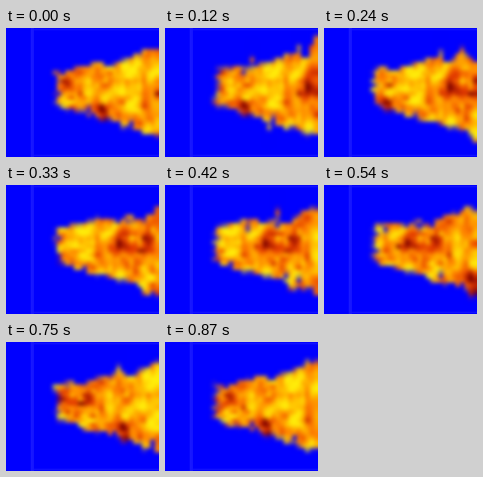
Recreate the animation shown at these times as a matplotlib script. Size 192 px wide and 162 px high, loop 0.9 s.

```python
import numpy as np
import matplotlib.pyplot as plt
from matplotlib.animation import FuncAnimation

W, H, DPI = 192, 162, 100
COLS, ROWS, STEPS = 36, 31, 30
CELL = W / COLS
TIP = 58
BLUE = np.array([0.0, 0.0, 1.0])

STOPS = np.linspace(0, 1, 5)
RAMP = np.array([(255, 238, 10), (255, 190, 0), (255, 130, 0),
                 (225, 55, 0), (120, 0, 0)]) / 255

# Hot spots drifting with the flow: column, height, size
SPOTS = [(6.8, -.2, 1.4), (9.2, -.12, 1.4), (14.2, -.31, 1.3),
         (10.6, .18, 1.0), (21.5, .68, 1.3), (25, .5, 1.5)]

rng = np.random.default_rng(12)
LEVELS = np.linspace(-1.8, 1.8, 23)
SHAPE = (STEPS, LEVELS.size)


def noise(spread, shape=SHAPE, blur=.25):
    """Random field that repeats along the flow."""
    a = rng.normal(0, spread, shape)
    return a + blur * (np.roll(a, 1, 0) + np.roll(a, -1, 0))


heat_tex = noise(.21)
rough_tex = noise(.09)
tip_tex = noise(.5)
rim = noise(.05, (STEPS, 2), .5)

# Flecks outside the edge and gaps inside it: column, height, x where visible
flecks = [(rng.integers(STEPS), rng.choice([-1, 1]) * rng.choice([.8, 1.2]),
           rng.uniform(70, 170)) for _ in range(12)]

rows_y = (np.arange(ROWS) + .5) * CELL


def wrap(d):
    return (d + STEPS / 2) % STEPS - STEPS / 2


def column(c, step):
    """Colours of one grid column after the flow has moved by step cells."""
    x = (c + .5) * CELL
    if x < TIP:
        return np.tile(BLUE, (ROWS, 1))
    u = (c + step) % STEPS
    t = (x - TIP) / (W - TIP)
    half = 21 + 27 * t + 7 * t ** 4
    v = (rows_y - 72 - 11 * t ** .55) / half

    def sample(tex):
        return np.interp(v, LEVELS, tex[u])

    # Yellow stretch of the flow around column 29, hotter elsewhere
    heat = .42 + sample(heat_tex) - .2 * np.exp(-(wrap(u - 29) / 4) ** 2)
    for su, sv, size in SPOTS:
        heat += .45 * np.exp(-(wrap(u - su) / size) ** 2 - ((v - sv) / (.15 * size)) ** 2)

    # A gust flares the upper edge as it enters
    gust = .5 * np.exp(-(wrap(u - 9.5) / 2) ** 2) * np.clip((x - 165) / 25, 0, 1)
    edge = np.where(v < 0, 1 + rim[u, 0] + gust, 1 + rim[u, 1]) + sample(rough_tex)
    cover = np.clip((edge - abs(v)) * half / CELL * 1.4 + .5, 0, 1)
    cover *= np.clip((x - TIP) / CELL - .6 + sample(tip_tex), 0, 1)

    for fu, fv, fx in flecks:
        if u == fu and abs(x - fx) < 14:
            cover += np.sign(abs(fv) - 1) * np.exp(-((v - fv) * half / 4) ** 2)
    cover = np.clip(cover, 0, 1)[:, None]

    heat = np.clip(heat, 0, 1)
    hot = np.stack([np.interp(heat, STOPS, RAMP[:, k]) for k in range(3)], axis=1)
    return BLUE + cover * (hot - BLUE)


def plume(step):
    return np.stack([column(c, step) for c in range(COLS)], axis=1)


fig = plt.figure(figsize=(W / DPI, H / DPI), dpi=DPI, facecolor="blue")
ax = fig.add_axes([0, 0, 1, 1])
ax.axis("off")
image = ax.imshow(plume(0), extent=(0, W, ROWS * CELL, 0),
                  interpolation="bicubic", aspect="auto")
ax.set_xlim(0, W)
ax.set_ylim(H, 0)

# Faint frame lines
ax.plot([32.5, 32.5], [0, H], color="white", alpha=.09, lw=4 * 72 / DPI)
for y in (2, 160):
    ax.plot([36, W], [y, y], color="white", alpha=.06, lw=2 * 72 / DPI)


def update(step):
    image.set_data(plume(step))
    return [image]


anim = FuncAnimation(fig, update, frames=STEPS, interval=30,
                     repeat=True, repeat_delay=0)
plt.show()
```
